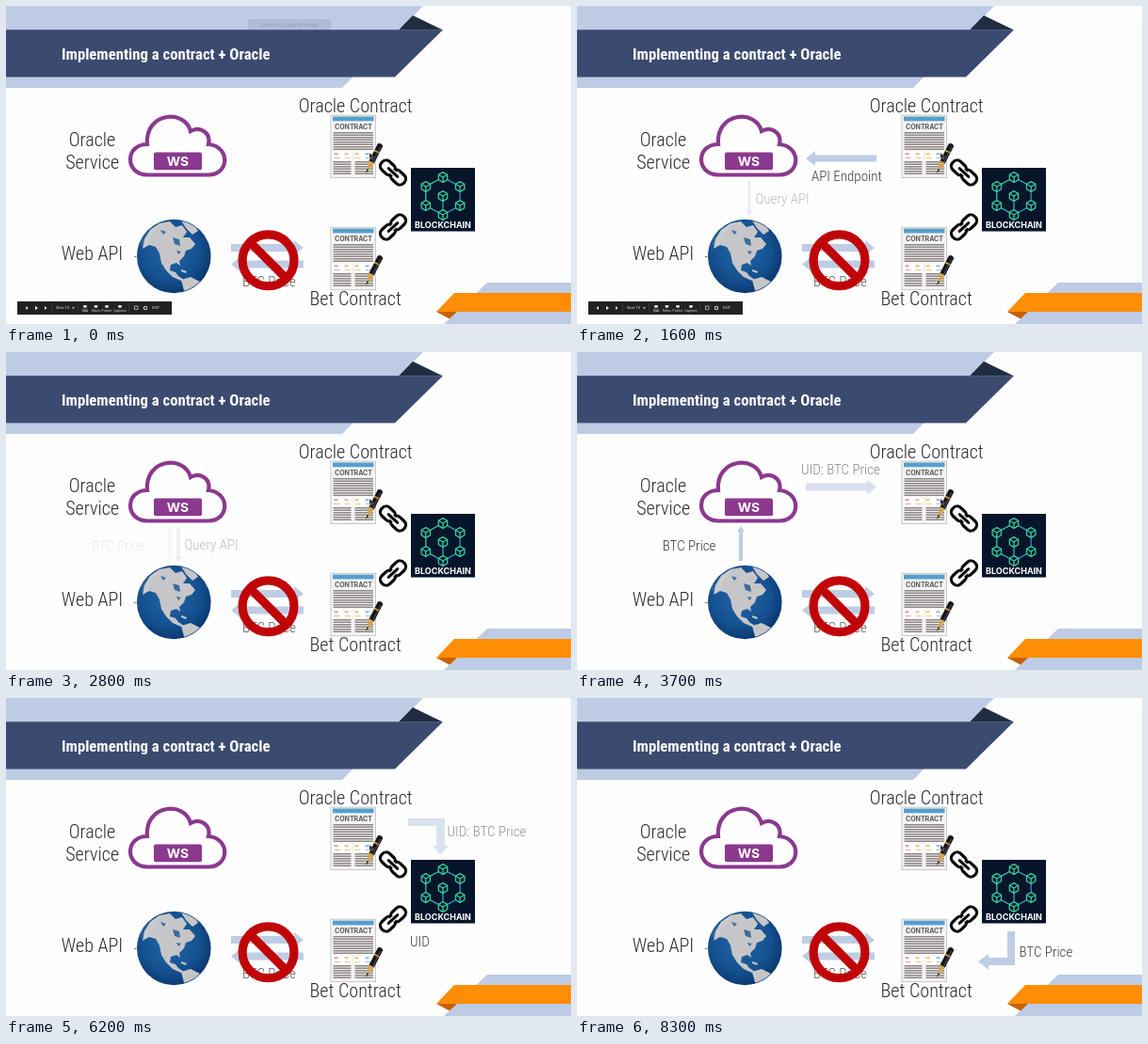
An HTML page for the animation above (8.4 s loop, 600 by 338 pixels).

```html
<!DOCTYPE html>
<html lang="en">
<head>
<meta charset="utf-8">
<title>Implementing a contract + Oracle</title>
<style>
  html, body { margin: 0; width: 100%; height: 100%; overflow: hidden; background: #fefefe; }
  svg { display: block; width: 100%; height: 100%; }
  text { font-family: "Roboto Condensed", Roboto, sans-serif; font-stretch: 75%; font-weight: 300; }
  .narrow text { letter-spacing: -.05em; }
  .title { font-size: 16.7px; font-weight: 700; fill: #fff; }
  .big { font-size: 20.1px; fill: #2c2c2c; text-anchor: middle; }
  .small { font-size: 15px; fill: #3a3a3a; }
  .arrow { fill: #bfcce5; }
  svg .plain { font-family: Inter, Roboto, sans-serif; font-stretch: 100%; font-weight: 700; letter-spacing: 0; text-anchor: middle; }
  svg .tiny { font-family: Roboto, sans-serif; font-stretch: 100%; font-weight: 400; letter-spacing: 0; text-anchor: middle; }
</style>
</head>
<body>
<svg id="stage" viewBox="0 0 600 338">
  <defs>
    <radialGradient id="sea" cx=".45" cy=".42" r=".62">
      <stop offset="0" stop-color="#2468a8"/>
      <stop offset=".65" stop-color="#14508f"/>
      <stop offset=".93" stop-color="#0b3a72"/>
      <stop offset="1" stop-color="#4a729c"/>
    </radialGradient>
    <linearGradient id="teal" gradientUnits="userSpaceOnUse" x1="444" y1="196" x2="484" y2="210">
      <stop offset="0" stop-color="#36cfa0"/>
      <stop offset="1" stop-color="#2b86c4"/>
    </linearGradient>
    <clipPath id="disc"><circle cx="178.3" cy="266" r="38.5"/></clipPath>

    <g id="paper">
      <rect x=".4" y=".4" width="47.700" height="66.500" fill="#f4f4f4" stroke="#bcbcbc" stroke-width=".8"/>
      <rect x="2.500" y="1.800" width="43.500" height="4.800" fill="#559fcb"/>
      <text class="plain" x="24.500" y="15" font-size="7" fill="#5a5a5a">CONTRACT</text>
      <g id="print" stroke="#8f8686" stroke-width="1.500"></g>
      <g id="marks"></g>
    </g>
    <g id="pen" transform="translate(53 32) rotate(27)">
      <path d="M-3 0Q0-3 3 0V21H-3Z" fill="#15171c"/>
      <path d="M-3 8H3M-3 21H3" stroke="#d9a43c" stroke-width="1.600"/>
      <path d="M-2.600 22H2.600L.5 31H-.5Z" fill="#d6a448"/>
      <path d="M-1 29H1L0 34Z" fill="#222"/>
      <path d="M1.200 2V20" stroke="#555b66" stroke-width=".8"/>
    </g>
    <g id="chain" fill="none" stroke="#080808" stroke-width="3.200">
      <rect x="-16" y="-6" width="17" height="12" rx="5.500"/>
      <rect x="-1" y="-6" width="17" height="12" rx="5.500"/>
      <path d="M-5 0H5" stroke="#fefefe" stroke-width="5.400"/>
      <path d="M-6.500 0H6.500" stroke-width="3" stroke-linecap="round"/>
    </g>
    <g id="cube" stroke-linejoin="round">
      <path d="M0-5.400L4.700-2.700V2.700L0 5.400L-4.700 2.700V-2.700Z" fill="#08182c"/>
      <path d="M-4.700-2.700L0 0L4.700-2.700M0 0V5.400" fill="none"/>
    </g>
  </defs>

  <rect width="600" height="338" fill="#fefefe"/>

  <!-- ribbons -->
  <path d="M0 0H443L357 87H0Z" fill="#becbe4"/>
  <path d="M432 10L464 25.500H417Z" fill="#202d40"/>
  <path d="M0 25.200H464L413 75.600H0Z" fill="#3b4a6f"/>
  <path d="M511 294H600V338H465Z" fill="#becbe4"/>
  <path d="M457 325H479L471 332.500Z" fill="#c46200"/>
  <path d="M476 305H600V325H457Z" fill="#ff8d05"/>
  <text id="title" class="title" x="59" y="57">Implementing a contract + Oracle</text>
  <g id="toast">
    <rect x="257" y="14" width="88" height="11" rx="1" fill="#46516b" opacity=".12"/>
    <text class="tiny" x="301" y="21.500" font-size="5" fill="#69758e" opacity=".4">Press Esc to exit full screen</text>
  </g>

  <g id="labels"></g>

  <!-- cloud service -->
  <path d="M150 179.500C126 179 126 147 150 147C147 113 190 109 196 133C206 127 218 135 215 147C238 149 238 179 215 179.500Z" fill="#fefefe" stroke="#8a398e" stroke-width="4.200"/>
  <rect x="157" y="155.500" width="51" height="18.700" rx="2" fill="#8a398e"/>
  <text class="plain" x="182.500" y="169.800" font-size="13.800" fill="#fff">WS</text>

  <!-- globe -->
  <circle cx="178.300" cy="266" r="39.300" fill="url(#sea)"/>
  <g clip-path="url(#disc)" fill="#c6c6c9">
    <path d="M147 248L153 238L163 231L174 229L180 235L187 233L192 240L188 246L195 246L201 253L197 258L191 260L189 266L184 271L185 276L181 273L175 275L174 281L180 283L183 287L189 291L186 292L177 288L170 281L165 273L163 263L159 256L152 254L145 258Z"/>
    <path d="M186 228L199 231L204 239L198 243L191 236Z"/>
    <path d="M186 291L196 288L206 293L208 299L199 306L190 306Z"/>
    <path d="M186 280L192 282L191 284L186 282Z"/>
    <path d="M177 246L184 248L185 255L179 253ZM181 260L186 261L183 264ZM164 238L170 240L167 243Z" fill="#3d6c9c"/>
    <path d="M142 254Q150 234 168 229Q155 240 150 255Z" fill="#fff" opacity=".1"/>
  </g>
  <path d="M136 266.500H138.500" stroke="#777"/>

  <!-- blocked exchange -->
  <g id="exchange"></g>
  <text class="small" x="251" y="297.700" opacity=".85">BTC Price</text>
  <g fill="none" stroke="#c00508" stroke-width="9.200">
    <circle cx="278.500" cy="270.300" r="27.400"/>
    <path d="M259 251L298 290"/>
  </g>

  <!-- contracts and chain -->
  <g id="contracts"></g>
  <path d="M386 156V162L387.500 160.600L388.600 163L389.500 162.500L388.500 160.300H390.500Z" fill="#111" stroke="#fff" stroke-width=".3"/>
  <use href="#chain" transform="translate(411 177) rotate(43)"/>
  <use href="#chain" transform="translate(411 235) rotate(-43)"/>
  <rect x="430" y="172" width="68" height="67.500" fill="#07152a"/>
  <g id="blocks" stroke="url(#teal)" stroke-width="1.300"></g>
  <text class="plain" x="464" y="235.600" font-size="9" fill="#fff">BLOCKCHAIN</text>

  <g id="steps"></g>

  <g id="toolbar" fill="#ddd">
    <rect x="12" y="314" width="164" height="14" fill="#212223"/>
    <path d="M23 319V323L20.500 321ZM31 318.700V323.300L34 321ZM41 319V323L43.500 321ZM70 320.300H73L71.500 322Z"/>
    <path d="M48.500 316V326M76.500 316V326M130.500 316V326" stroke="#444" stroke-width=".6"/>
    <g id="tools"></g>
    <rect x="136.500" y="319" width="3.500" height="3.500" fill="none" stroke="#ccc" stroke-width=".7"/>
    <circle cx="148" cy="321" r="1.700" fill="none" stroke="#ccc" stroke-width="1.100"/>
  </g>
</svg>
<script>
const LOOP = 8400, TICK = 100;
const $ = id => document.getElementById(id);
const add = (id, markup) => $(id).insertAdjacentHTML('beforeend', markup);
const label = (cls, x, y, words) => `<text class="${cls}" x="${x}" y="${y}">${words}</text>`;
const shape = d => `<path class="arrow" d="${d}"/>`;

// Straight arrow pointing along +x, then turned and placed at its tail.
function arrow(x, y, length, angle, half = 4, wing = 8, head = 10) {
  const neck = length - head;
  return `<g transform="translate(${x} ${y}) rotate(${angle})">` +
    shape(`M0 ${-half}H${neck}V${-wing}L${length} 0L${neck} ${wing}V${half}H0Z`) + '</g>';
}

add('labels', [
  [91.5, 149, 'Oracle'], [91.7, 173, 'Service'], [91.5, 270, 'Web API'],
  [371.2, 112.8, 'Oracle Contract'], [371.2, 318, 'Bet Contract']
].map(row => label('big', ...row)).join(''));

add('exchange', arrow(239, 257, 77, 0) + arrow(316, 274.5, 77, 180));

// Printed lines: a full-width block, then two columns.
let print = '';
for (let y = 19; y < 38; y += 2.5) print += `M3 ${y}H45.5`;
for (let y = 50; y < 65; y += 2.5) print += `M3 ${y}H22M26 ${y}H45.5`;
add('print', `<path d="${print}"/>`);
add('marks', '<path d="M2.5 39H22.5V48H2.5ZM25.5 39H46V48H25.5Z" fill="#fff"/>' +
  ['#e39a92', '#e9b98a', '#d9cb6a', '#8fb6cf'].map((color, i) =>
    `<rect x="${4 + i * 11}" y="40.5" width="4" height="2" fill="${color}"/>` +
    `<rect x="${4 + i * 11}" y="45" width="6" height="1.5" fill="${color}" opacity=".7"/>`).join(''));
add('contracts', [115.7, 234.8].map(y =>
  `<g transform="translate(344.5 ${y})"><use href="#paper"/><use href="#pen"/></g>`).join(''));

const center = [464, 202];
const nodes = Array.from({ length: 6 }, (_, i) => {
  const a = (i * 60 - 90) * Math.PI / 180;
  return [center[0] + 21 * Math.cos(a), center[1] + 20 * Math.sin(a)];
});
add('blocks', `<path d="M${nodes.join('L')}ZM${center}L${nodes[3]}" fill="none"/>` +
  [...nodes, center].map(([x, y]) => `<use href="#cube" x="${x}" y="${y}"/>`).join(''));

add('tools', [[60, 'Slide 10'], [84, 'Q&amp;A'], [95.5, 'Notes'], [107, 'Pointer'], [121, 'Captions'], [159, 'EXIT']]
  .map(([x, word], i) => {
    const icon = i > 0 && i < 5;
    return (icon ? `<rect x="${x - 1.8}" y="318" width="3.6" height="2.7" rx=".6"/>` : '') +
      `<text class="tiny" x="${x}" y="${icon ? 325 : 322.4}" font-size="${icon ? 3.4 : 4}">${word}</text>`;
  }).join(''));

// Each step: fade-in start and end, fade-out start and end, drawing.
const steps = [
  [100, 500, 1200, 1600, arrow(368.5, 226, 36, -90, 2.5, 5, 7) + label('small', 253, 214.5, 'UID &amp; API Endpoint')],
  [700, 1150, 1700, 2150, arrow(318, 162, 75, 180, 3.5) + label('small', 249, 185.5, 'API Endpoint')],
  [1450, 1900, 2500, 2950, arrow(183, 186, 37, 90, 1.6, 4, 6) + label('small', 189.5, 209.5, 'Query API')],
  [2750, 3200, 4000, 4450, arrow(174, 222, 37, -90, 2, 4, 6) + label('small', 90.7, 210.8, 'BTC Price')],
  [3400, 3900, 4800, 5250, arrow(243, 143.5, 75, 0) + label('small', 238, 129.5, 'UID: BTC Price')],
  [4850, 5250, 6000, 6450, shape('M427 128H466V157H470L461.5 167L453 157H457V136H427Z') + label('small', 468.5, 147, 'UID: BTC Price')],
  [5700, 6150, 6900, 7350, label('small', 429, 264, 'UID')],
  [7200, 7700, LOOP, LOOP + 1, shape('M457 248H465V284H437V289L426 280L437 272V276H457Z') + label('small', 469.5, 275, 'BTC Price')]
];
add('steps', steps.map(step => `<g>${step[4]}</g>`).join(''));

const ramp = (t, a, b) => Math.min(1, Math.max(0, (t - a) / (b - a)));
const fade = (node, value) => node.setAttribute('opacity', value);

function draw(now) {
  const t = Math.floor((now % LOOP) / TICK) * TICK;
  steps.forEach(([a, b, c, d], i) => fade($('steps').children[i], ramp(t, a, b) - ramp(t, c, d)));
  fade($('toast'), 1 - ramp(t, 0, 300));
  fade($('toolbar'), 1 - ramp(t, 1700, 2300));
}

// Tighten tracking when no condensed face is available.
if ($('title').getComputedTextLength() > 237) $('stage').classList.add('narrow');

const start = performance.now();
function frame() {
  draw(performance.now() - start);
  requestAnimationFrame(frame);
}
frame();
</script>
</body>
</html>
```
